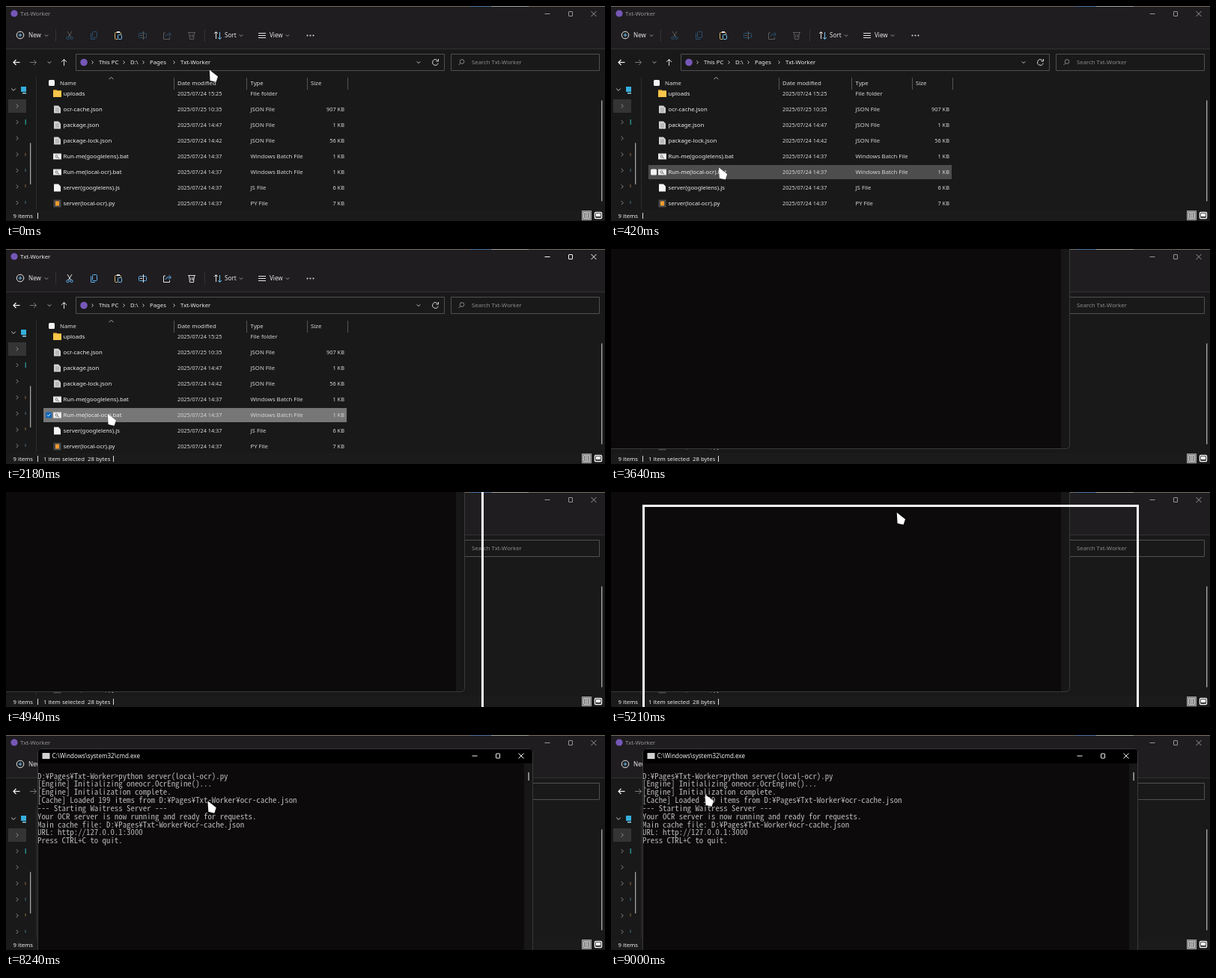
Animation of 800 by 288 pixels, one loop 9.03 s. Source, as an HTML page with a canvas:

```html
<!DOCTYPE html>
<html lang="en">
<head>
<meta charset="utf-8">
<title>Starting a local server</title>
<style>
html, body { margin: 0; width: 100%; height: 100%; overflow: hidden; background: #191919; }
canvas { display: block; width: 800px; height: 288px; }
</style>
</head>
<body>
<canvas id="stage" width="800" height="288"></canvas>
<script>
const c = document.getElementById('stage').getContext('2d');
const LOOP = 9030;
const UI = '"Noto Sans", "Open Sans", sans-serif';
const MONO = '"Noto Sans Mono CJK JP", "Liberation Mono", monospace';
const FOLDER = 'Txt-Worker', PARENT = 'Pages';
const CELL = 5.42, ROW = 10.85;

// Font size at which one console character is CELL wide
c.font = '100px ' + MONO;
const monoSize = CELL * 100 / c.measureText('0').width;

const files = [
  ['uploads', '2025/07/24 15:25', 'File folder', '', 'folder'],
  ['ocr-cache.json', '2025/07/25 10:35', 'JSON File', '907 KB', 'json'],
  ['package.json', '2025/07/24 14:47', 'JSON File', '1 KB', 'json'],
  ['package-lock.json', '2025/07/24 14:42', 'JSON File', '56 KB', 'json'],
  ['Run-me(googlelens).bat', '2025/07/24 14:37', 'Windows Batch File', '1 KB', 'bat'],
  ['Run-me(local-ocr).bat', '2025/07/24 14:37', 'Windows Batch File', '1 KB', 'bat'],
  ['server(googlelens).js', '2025/07/24 14:37', 'JS File', '6 KB', 'page'],
  ['server(local-ocr).py', '2025/07/24 14:37', 'PY File', '7 KB', 'py']
];
const PICK = 5;

const dir = `D:¥${PARENT}¥${FOLDER}`;
// [time shown, line]
const output = [
  [0, dir + '>python server(local-ocr).py'],
  [0, '[Engine] Initializing oneocr.OcrEngine()...'],
  [7240, '[Engine] Initialization complete.'],
  [7300, `[Cache] Loaded 199 items from ${dir}¥ocr-cache.json`],
  [7330, '--- Starting Waitress Server ---'],
  [7360, 'Your OCR server is now running and ready for requests.'],
  [7360, `Main cache file: ${dir}¥ocr-cache.json`],
  [7360, 'URL: http://127.0.0.1:3000'],
  [7360, 'Press CTRL+C to quit.']
];

// Pointer legs: start, end, from x, y, to x, y
const legs = [
  [30, 430, 272, 86, 144, 217],
  [430, 730, 144, 217, 139, 226],
  [1790, 2030, 139, 226, 136, 221],
  [3520, 3610, 136, 221, 220, 7],
  [4820, 5180, 291, -69, 382, 28],
  [5700, 6270, 382, 28, 272, 89],
  [8180, 9000, 272, 89, 126, 80]
];

const mix = (a, b, p) => a + (b - a) * p;
const span = (t, a, b) => Math.min(1, Math.max(0, (t - a) / (b - a)));
const ease = p => p * p * (3 - 2 * p);
const gray = v => { v = Math.round(v); return `rgb(${v},${v},${v})`; };

function rect(x, y, w, h, color) {
  c.fillStyle = color;
  c.fillRect(x, y, w, h);
}
function frame(x, y, w, h, color, r = 0, lw = 1) {
  c.strokeStyle = color;
  c.lineWidth = lw;
  c.beginPath();
  c.roundRect(x, y, w, h, r);
  c.stroke();
}
function line(color, pts, lw = 1) {
  c.strokeStyle = color;
  c.lineWidth = lw;
  c.beginPath();
  for (let i = 0; i < pts.length; i += 2) c.lineTo(pts[i], pts[i + 1]);
  c.stroke();
}
function disc(x, y, r, color) {
  c.fillStyle = color;
  c.beginPath();
  c.arc(x, y, r, 0, 7);
  c.fill();
}
function ring(x, y, r, color, from = 0, to = 6.3) {
  c.strokeStyle = color;
  c.lineWidth = 1;
  c.beginPath();
  c.arc(x, y, r, from, to);
  c.stroke();
}
// y is the middle of the line
function text(s, x, y, color = '#e8e8e8', size = 7.75, align = 'left') {
  c.font = size + 'px ' + UI;
  c.textAlign = align;
  c.fillStyle = color;
  c.fillText(s, x, y + 2.8);
}
const right = (x, y, color, r = 2) => line(color, [x - r / 2, y - r, x + r / 2, y, x - r / 2, y + r]);
const down = (x, y, color, r = 2.2) => line(color, [x - r, y - r / 2, x, y + r / 2, x + r, y - r / 2]);

function buttons(x, y, color) {
  line(color, [x - 3.5, y + .5, x + 3.5, y + .5]);
  frame(x + 28.5, y - 2.5, 5, 6, color, .5);
  line(color, [x + 58.5, y - 3, x + 65.5, y + 4]);
  line(color, [x + 65.5, y - 3, x + 58.5, y + 4]);
}

function fileIcon(kind, y) {
  if (kind === 'folder') {
    rect(63, y - 5, 5, 3, '#d99a20');
    rect(63, y - 4, 11, 8.5, '#f7c64a');
  } else if (kind === 'bat') {
    rect(63, y - 4, 11, 8, '#dcdcdc');
    rect(64, y - 2, 9, 5, '#f6f6f6');
    ring(67.5, y, 1.5, '#666');
    line('#666', [68.5, y + 1, 71, y + 2.5]);
  } else if (kind === 'py') {
    rect(63.5, y - 5, 10, 10, '#4a4a4a');
    rect(66, y - 3, 5, 6, '#f29a2e');
  } else {
    c.fillStyle = kind === 'json' ? '#d4d4d4' : '#f4f4f4';
    c.beginPath();
    for (const [x, dy] of [[64, -5], [70, -5], [73, -2], [73, 5], [64, 5]]) c.lineTo(x, y + dy);
    c.fill();
    if (kind === 'json') for (let i = -2; i < 4; i += 2) line('#8d8d8d', [66, y + i + .5, 71, y + i + .5], .8);
  }
}

function toolbar(on) {
  const ink = gray(mix(92, 225, on));
  const blue = `rgb(${mix(40, 90, on)},${mix(80, 175, on)},${mix(112, 235, on)})`;
  const white = '#e4e4e4';
  ring(19, 39, 4.8, white);
  line('#6fc0f0', [16.5, 39, 21.5, 39]);
  line('#6fc0f0', [19, 36.5, 19, 41.5]);
  text('New', 30, 39.5, white, 8.1);
  down(54, 39.5, '#999');
  line('#333', [66.5, 31, 66.5, 48]);
  // cut, copy
  line(ink, [82, 34, 87, 42]);
  line(ink, [88, 34, 83, 42]);
  ring(82.5, 43, 1.7, blue);
  ring(87.5, 43, 1.7, blue);
  frame(115.5, 34.5, 6, 8, blue, 1);
  line(blue, [113.5, 36.5, 113.5, 44.5, 119, 44.5]);
  // paste
  frame(145.5, 35.5, 8, 9, '#d7b36a', 1);
  rect(148, 34, 4, 2, white);
  rect(149, 38, 6, 7, '#1f1d20');
  frame(149.5, 38.5, 5, 6, '#6fc0f0', 1);
  // rename, share, delete
  frame(177.5, 36.5, 10, 6, blue, 1);
  line(ink, [183.5, 34, 183.5, 45]);
  line(ink, [179, 39.5, 182, 39.5]);
  line(ink, [213, 36, 210.5, 36, 210.5, 44.5, 218.5, 44.5, 218.5, 42]);
  line(blue, [213, 41, 215, 38, 220, 38]);
  line(blue, [217.5, 35, 220.5, 38, 217.5, 41]);
  line(ink, [243, 35.5, 253, 35.5]);
  line(ink, [244.5, 36, 245.5, 44.5, 250.5, 44.5, 251.5, 36]);
  line(ink, [247, 38, 247, 42]);
  line(ink, [249.5, 38, 249.5, 42]);
  line('#333', [265.5, 31, 265.5, 48]);
  // sort, view, more
  line(white, [280.5, 44, 280.5, 35]);
  line(white, [278, 37, 280.5, 34.5, 283, 37]);
  line('#6fc0f0', [285.5, 35, 285.5, 44]);
  line('#6fc0f0', [283, 42, 285.5, 44.5, 288, 42]);
  text('Sort', 292, 39.5, white, 8.1);
  down(314, 39.5, '#999');
  for (let y = 36.5; y < 44; y += 3) line(white, [337, y, 347, y]);
  text('View', 352, 39.5, white, 8.1);
  down(376, 39.5, '#999');
  for (let x = 402.5; x < 412; x += 4) disc(x, 39.5, 1, white);
}

function addressBar() {
  line('#f4f4f4', [18.5, 75.5, 10, 75.5], 1.2);
  line('#f4f4f4', [13.5, 72, 10, 75.5, 13.5, 79], 1.2);
  line('#777', [32, 75.5, 40.5, 75.5]);
  line('#777', [37, 72, 40.5, 75.5, 37, 79]);
  down(58, 75.5, '#bbb');
  line('#e4e4e4', [77.5, 80, 77.5, 71.5]);
  line('#e4e4e4', [74, 75, 77.5, 71.5, 81, 75]);
  frame(93.5, 64.5, 492, 22, '#505050');
  frame(594.5, 64.5, 198, 22, '#505050');
  disc(104, 75.5, 4.8, '#7657b8');
  [['This PC', 124], ['D:\\', 166], [PARENT, 192], [FOLDER, 233]].forEach(([s, x]) => {
    right(x - 8.5, 75.5, '#ccc');
    text(s, x, 75.5, '#f0f0f0');
  });
  down(551, 75.5, '#ccc');
  ring(573.5, 75.5, 3.8, '#ddd', .3, 5.6);
  line('#ddd', [577.5, 71, 577.5, 74, 574.5, 74]);
  ring(609, 74.5, 2.8, '#888');
  line('#888', [607, 76.5, 604.5, 79]);
  text('Search ' + FOLDER, 622, 75.5, '#8c8c8c');
}

function sidebar() {
  down(10, 112, '#ccc', 2.8);
  rect(20, 108, 7, 7, '#35aedd');
  rect(22, 116, 5, 1.5, '#8fd4ee');
  rect(3, 125, 24, 18, '#343434');
  for (let i = 0; i < 7; i++) right(15, 134 + i * 21.6, '#8c8c8c', 2.5);
  rect(25.5, 152, 1.5, 7, '#2a8a86');
  [199, 220, 241, 263].forEach((y, i) => rect(25.5, y - 2, 1, 4, i % 2 ? '#4c6f80' : '#8a6a3a'));
  rect(32, 183.5, 1.3, 55.5, '#a4a4a4');
  line('#2c2c2c', [40.5, 95, 40.5, 272]);
}

function explorer(t, px, py) {
  const active = t < 2580 ? span(t, 1790, 2030) : 0;
  const picked = t >= 1090;
  rect(0, 0, 800, 288, '#191919');
  rect(0, 0, 800, 57, '#1f1d20');
  line('#343236', [0, 57.5, 800, 57.5]);
  rect(0, 0, 800, 1, '#77705f');
  rect(620, 0, 28, 1, '#4a6f9c');
  rect(648, 0, 50, 1, '#a8a49a');

  disc(11, 10, 4.6, '#7657b8');
  text(FOLDER, 19, 10.5, gray(mix(150, 240, active)));
  buttons(723, 10, gray(mix(150, 245, active)));
  toolbar(t < 2580 ? active : 1);
  addressBar();
  sidebar();

  const over = t < 2580 && px > 50 && px < 455 && py > 112 ? Math.floor((py - 106.5) / 21) : -1;
  files.forEach(([name, date, type, size, kind], i) => {
    const y = 117.5 + i * 21;
    const sel = picked && i === PICK;
    if (sel || i === over) {
      rect(50, y - 9.5, 405, 19, gray(sel ? mix(77, 119, span(t, 1060, 1390)) : 77));
      c.fillStyle = sel ? '#1267b8' : '#f4f4f4';
      c.beginPath();
      c.roundRect(53, y - 4, 8, 8, 1.5);
      c.fill();
      if (sel) line('#dff', [55, y, 56.5, y + 1.5, 59, y - 1.5]);
    }
    fileIcon(kind, y);
    text(name, 76.5, y, '#eeeeee');
    text(date, 229, y, '#d6d6d6', 7.3);
    text(type, 326.5, y, '#d6d6d6');
    text(size, 452, y, '#d6d6d6', 7.4, 'right');
  });

  rect(41, 92, 420, 20, '#191919');
  fileIcon('folder', 117.5);
  c.fillStyle = '#f4f4f4';
  c.beginPath();
  c.roundRect(57, 99, 8, 8, 1.5);
  c.fill();
  line('#aaa', [137.5, 98, 140.5, 95.5, 143.5, 98]);
  [['Name', 72], ['Date modified', 229], ['Type', 326.5], ['Size', 407]].forEach(([s, x]) => text(s, x, 103.5, '#dedede'));
  [225, 322, 403, 457].forEach(x => line('#555', [x - .5, 96, x - .5, 112]));
  rect(795, 126.5, 1.4, 135, '#a4a4a4');

  rect(0, 273, 800, 15, '#1b1b1b');
  text('9 items', 9.5, 281.5, '#eee');
  line('#ddd', [42.5, 277, 42.5, 285]);
  if (picked) {
    text('1 item selected  28 bytes', 50, 281.5, '#eee');
    line('#ddd', [143.5, 277, 143.5, 285]);
  }
  rect(769, 274, 13, 13, '#6c6c6c');
  frame(769.5, 274.5, 12, 12, '#aaa');
  frame(771.5, 276.5, 8, 8, '#ddd');
  for (let y = 278.5; y < 284; y += 2) line('#ddd', [773, y, 778, y]);
  frame(786.5, 276.5, 9, 8, '#f4f4f4', 1, 1.4);
  rect(788, 278, 6, 4, '#fff');
}

// Caret is shown in alternate half seconds and starts lit after new output
function caretOn(t) {
  const since = t < 7360 ? t - 5730 : t - 7350;
  return since >= 0 && Math.floor(since / 530) % 2 === 0;
}

function terminal(t, x, y) {
  c.save();
  c.translate(x, y);
  c.beginPath();
  c.roundRect(0, 0, 662, 349, 4);
  c.fillStyle = '#0c0a0a';
  c.fill();
  c.clip();
  rect(0, 0, 662, 20, '#000');
  rect(650, 20, 12, 329, '#171717');
  rect(655.3, 32, 1.6, 11, '#a0a0a0');
  rect(6.5, 6, 10, 8, '#d0d0d0');
  text('C:\\Windows\\system32\\cmd.exe', 19.5, 10.5, '#f2f2f2', 8);
  buttons(584, 9.5, '#f2f2f2');
  c.font = monoSize + 'px ' + MONO;
  c.textAlign = 'left';
  c.fillStyle = '#b8b8b8';
  const shown = output.filter(o => t >= o[0]);
  shown.forEach((o, i) => c.fillText(o[1], 0, 40.5 + i * ROW));
  if (caretOn(t)) rect(.5, 39.2 + shown.length * ROW, 5.2, 3, '#e4e4e4');
  c.restore();
  frame(x + .5, y + .5, 661, 348, '#3a3a3a', 4);
}

function pointer(x, y) {
  c.fillStyle = '#fff';
  c.strokeStyle = 'rgba(0,0,0,.4)';
  c.lineWidth = 1;
  c.beginPath();
  for (const [dx, dy] of [[-.3, -.5], [11, 8.5], [8.6, 15.8], [.6, 14]]) c.lineTo(x + dx, y + dy);
  c.closePath();
  c.stroke();
  c.fill();
}

function pointerAt(t) {
  const leg = legs.filter(l => t >= l[0]).pop() || legs[0];
  const p = ease(span(t, leg[0], leg[1]));
  return [mix(leg[2], leg[4], p), mix(leg[3], leg[5], p)];
}

function draw(t) {
  const [px, py] = pointerAt(t);
  const dropped = t >= 5300;
  explorer(t, px, py);
  if (t >= 2580) {
    c.globalAlpha = span(t, 2550, 2640);
    terminal(t, dropped ? 42 : -49, dropped ? 18 : -81);
    c.globalAlpha = 1;
  }
  if (t >= 4850 && !dropped) frame(px - 338.5, py - 9.5, 660, 347, '#fff', 0, 3);
  if (t < 3640 || t >= 4850) pointer(px, py);
}

const start = performance.now();
function tick() {
  draw((performance.now() - start) % LOOP);
  requestAnimationFrame(tick);
}
tick();
</script>
</body>
</html>
```
